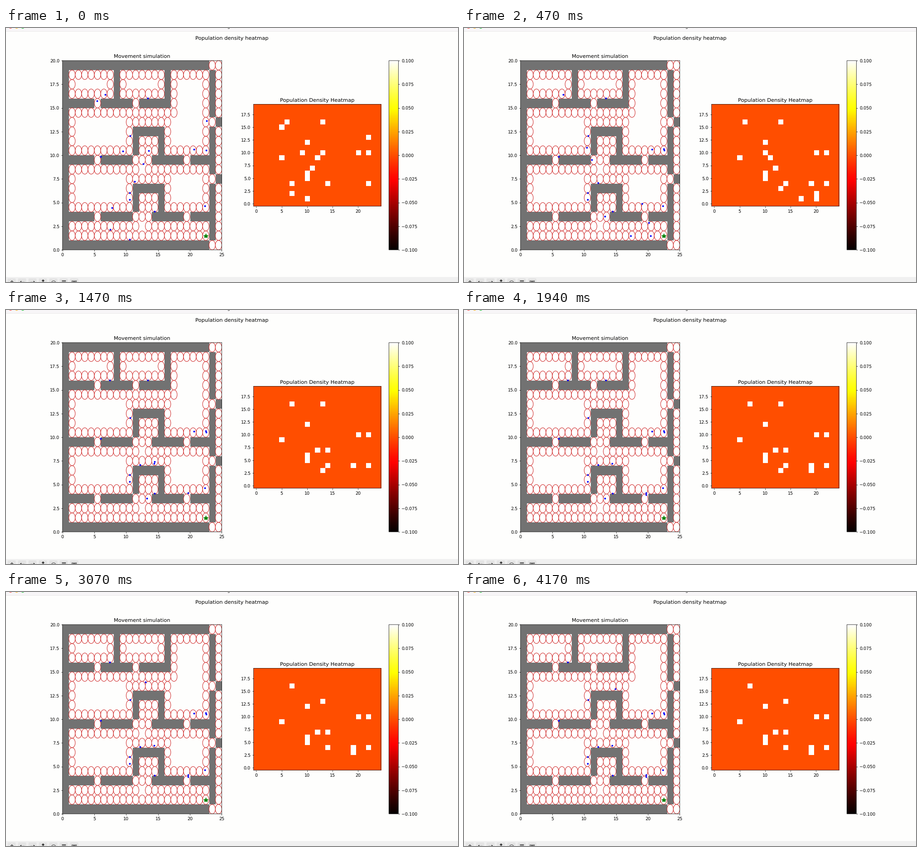
Animation of 998 by 561 pixels, one loop 4200 ms. Source, as a matplotlib script:

```python
import itertools

import numpy as np
import matplotlib.pyplot as plt
from matplotlib.animation import FuncAnimation
from matplotlib.collections import PatchCollection
from matplotlib.colors import ListedColormap
from matplotlib.patches import Circle, FancyBboxPatch, Rectangle

W, H = 998, 561
STEP, LOOP = 30, 4200
K = 0.687      # screen scale of the plotting window
PX = 0.72      # points per pixel at 100 dpi
GAMMA = 1.15   # the screen shows mid tones a little darker
PAPER = "#fefefd"
COLS, ROWS = 25, 20
GOAL = (22.5, 1.5)
PACE = 0.0222  # cells per ms
NEAR = [s for s in itertools.product((-1, 0, 1), repeat=2) if any(s)]

plt.rcParams.update({
    "font.family": "DejaVu Sans",
    "font.size": 10 * K,
    "text.hinting": "none",
    "axes.titlesize": 12 * K,
    "axes.titlepad": 6 * K,
    "axes.linewidth": 0.8 * K,
})
for axis in ("xtick", "ytick"):
    plt.rcParams.update({
        f"{axis}.major.size": 3.5 * K,
        f"{axis}.major.width": 0.8 * K,
        f"{axis}.major.pad": 3.5 * K,
    })


# ---- floor plan ----
def floor_plan():
    wall = np.zeros((ROWS, COLS), bool)

    def block(x, y, w, h):
        wall[y:y + h, x:x + w] = True

    block(0, 0, 1, ROWS)
    for y in (0, 19):
        block(0, y, 23, 1)
    block(23, 1, 1, 18)
    for y in (7, 13):  # exits on the right
        wall[y, 23:] = False, True
    for y in (3, 9):  # corridor with a small house above it
        block(0, y, 23, 1)
        for door, w in ((5, 1), (11, 3), (19, 1)):
            wall[y, door:door + w] = False
        block(11, y + 1, 5, 3)
        wall[y + 1:y + 3, 12:15] = False
    block(0, 15, 17, 1)
    wall[15, [5, 11]] = False
    for x in (8, 16):
        block(x, 16, 1, 3)
    return wall


wall = floor_plan()
free = np.pad(~wall, 1)


def beside_wall():
    """Free cells with a wall among their eight neighbours."""
    pad = np.pad(wall, 1)
    near = np.any([np.roll(pad, s, (0, 1)) for s in NEAR], axis=0)
    return near[1:-1, 1:-1] & ~wall


# ---- people ----
def cell_of(p):
    return int(p[1]) + 1, int(p[0]) + 1


def route(a, b):
    """Shortest way from a to b through the free cells."""
    cost = np.full(free.shape, np.inf)
    cost[cell_of(b)] = 0
    for _ in range(40):
        for s in NEAR:
            moved = np.roll(cost, s, (0, 1)) + np.hypot(*s)
            cost = np.where(free, np.minimum(cost, moved), np.inf)
    path, (y, x) = [a], cell_of(a)
    while cost[y, x] > 0:
        dy, dx = min(NEAR, key=lambda s: cost[y + s[0], x + s[1]] + np.hypot(*s))
        y, x = y + dy, x + dx
        path.append((x - 0.5, y - 0.5))
    return np.array(path[:max(1, len(path) - 1)] + [b])


class Walker:
    """Starts at a point and sets off at given times for the next stops."""

    def __init__(self, x, y, *stops):
        here = (x, y)
        ts, pts = [[0]], [[here]]
        for t, *stop in stops:
            path = route(here, tuple(stop))
            dist = np.cumsum(np.hypot(*np.diff(path, axis=0).T))
            ts.append(t + np.r_[0, dist] / PACE)
            pts.append(path)
            here = tuple(stop)
        self.t = np.concatenate(ts)
        self.x, self.y = np.vstack(pts).T
        self.gone = self.t[-1] if here == GOAL else LOOP

    def at(self, t):
        return np.interp(t, self.t, self.x), np.interp(t, self.t, self.y)


crowd = [Walker(*p) for p in (
    (10.58, 12.06), (20.64, 10.62), (22.53, 10.53), (5.99, 9.88),
    (10.54, 6.05), (10.51, 5.31), (14.42, 4.09), (22.38, 4.64))]
crowd += [Walker(*p, (0, *GOAL)) for p in (
    (12.68, 9.11), (7.48, 2.15), (10.51, 1.08))]
crowd += [
    Walker(5.42, 15.74, (0, 10.4, 10.81), (480, 12.85, 8.71),
           (960, 14.45, 7.42), (1600, 19.68, 3.92)),
    Walker(9.51, 10.43, (0, 11.15, 9.5), (480, 14.38, 7.22)),
    Walker(13.53, 10.48, (0, 19.08, 4.9), (480, 19.75, 4.11)),
    Walker(11.32, 7.22, (0, 12.18, 7.08)),
    Walker(7.77, 4.43, (0, 13.24, 3.56), (2430, *GOAL)),
    Walker(22.6, 13.66, (0, 22.46, 10.67)),
    Walker(6.7, 16.39, (1200, 7.41, 16.01)),
    Walker(13.42, 16.01, (2850, 14.88, 13.21)),
]


def people(t):
    return np.array([w.at(t) for w in crowd if t < w.gone])


def density(pos):
    grid = np.zeros((ROWS, COLS))
    x, y = pos.astype(int).T
    grid[y, x] = 1
    return grid


# ---- window frame ----
def draw_window(fig):
    ax = fig.add_axes([0, 0, 1, 1], zorder=-1)
    ax.set(xlim=(0, W), ylim=(H, 0))
    ax.axis("off")

    def band(y, h, color):
        ax.add_patch(Rectangle((0, y), W, h, fc=color, lw=0))

    band(0, 7, "#f8f6f8")
    band(7, 1, "#e9e9e9")
    for i, color in enumerate(("#fc5b57", "#fdbc2e", "#28c840")):
        ax.add_patch(Circle((10 + 13.5 * i, -3.3), 4.6, fc=color, lw=0))
    ax.text(W / 2, 0.4, "Figure 1", ha="center", color="#444444",
            family="Liberation Sans", weight="bold", size=9 * PX)

    band(549.5, 12, "#f0f0f0")
    for i, icon in enumerate("⌂←→↕○≡▣"):
        x = 12.5 + 23 * i
        ax.add_patch(FancyBboxPatch((x - 9, 553), 18, 20, fc="#e4e4e4", lw=0,
                                    boxstyle="round,pad=0,rounding_size=2"))
        ax.text(x, 566, icon, ha="center", color="#1c1c1c", weight="bold",
                size=14 * PX, clip_on=True)


fig, (sim, heat) = plt.subplots(1, 2, figsize=(W / 100, H / 100), dpi=100,
                                facecolor=PAPER)
fig.subplots_adjust(left=0.125, right=0.9, bottom=1 - 490 / H, top=1 - 72 / H,
                    wspace=0.2)
fig.suptitle("Population density heatmap", y=1 - 17.7 / H, fontsize=12 * K)
draw_window(fig)

gray = ListedColormap([(0.5 ** GAMMA,) * 3])
hot = ListedColormap(plt.get_cmap("hot")(np.arange(256)) ** GAMMA)

sim.set_facecolor(PAPER)
sim.imshow(np.ma.masked_where(~wall, wall), cmap=gray, origin="lower",
           extent=(0, COLS, 0, ROWS), aspect="auto", interpolation="nearest")
rings = [Circle((x + 0.5, y + 0.5), 0.5) for y, x in np.argwhere(beside_wall())]
sim.add_collection(PatchCollection(rings, fc="white", ec="#cc1818", lw=K))
sim.plot(*GOAL, "*", color="green", ms=10 * K)
dots = sim.scatter([], [], s=(3.9 * PX) ** 2, c="blue", lw=0, zorder=3)
sim.set(title="Movement simulation", xlim=(0, COLS), ylim=(0, ROWS),
        xticks=np.arange(0, 26, 5), yticks=np.arange(0, 20.1, 2.5))

image = heat.imshow(density(people(0)), cmap=hot, vmin=-0.1, vmax=0.1,
                    origin="lower", interpolation="nearest")
heat.set(title="Population Density Heatmap", xticks=np.arange(0, 21, 5),
         yticks=np.arange(0, 18, 2.5))
fig.colorbar(image, ax=heat, ticks=np.arange(-4, 5) * 0.025)
for ax in fig.axes:
    for spine in ax.spines.values():
        spine.set_snap(False)


def update(i):
    pos = people(i * STEP)
    dots.set_offsets(pos)
    image.set_data(density(pos))
    return dots, image


anim = FuncAnimation(fig, update, frames=LOOP // STEP, interval=STEP,
                     repeat=True, repeat_delay=0)
plt.show()
```
